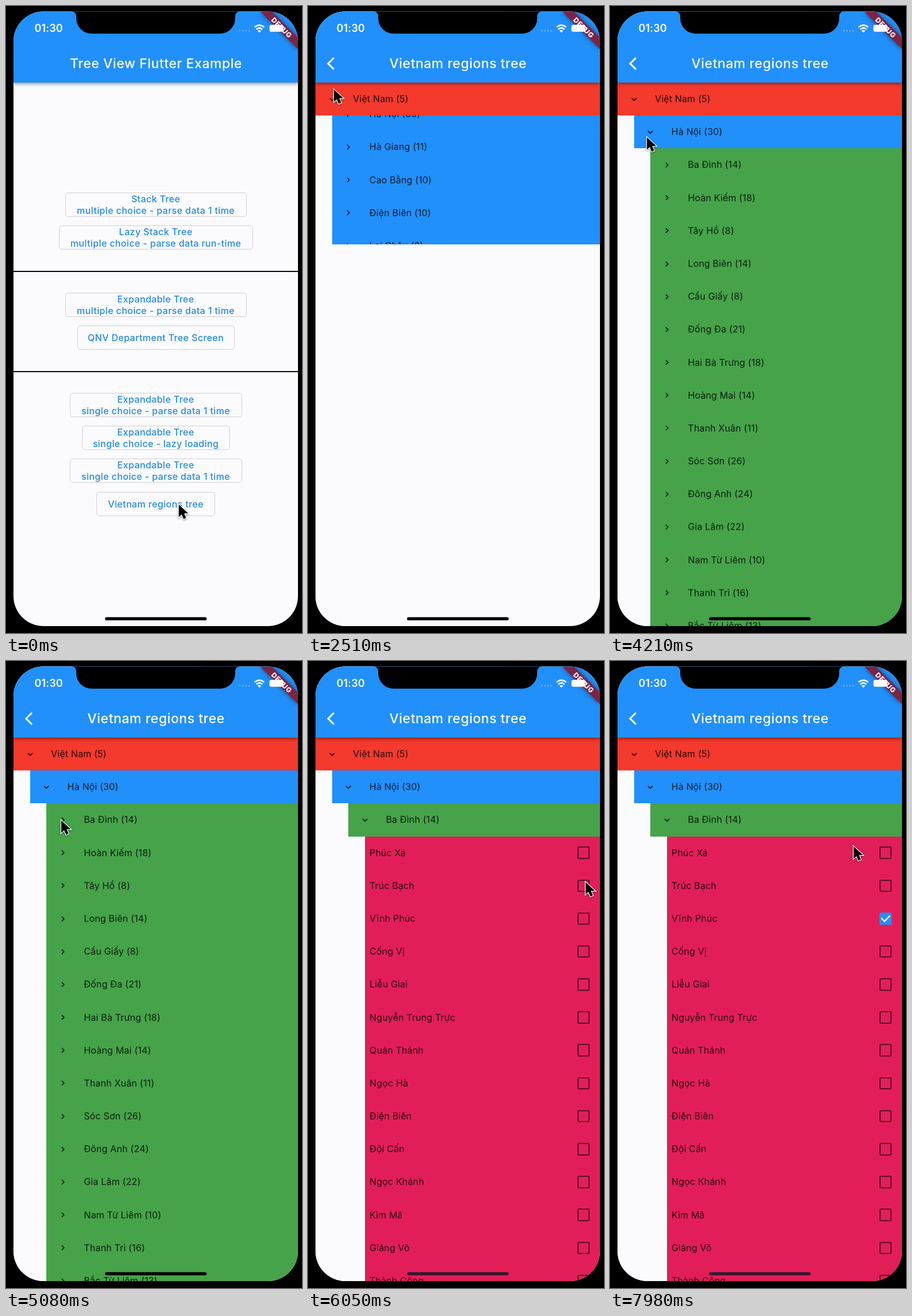
Write an HTML page that moves like this. It is 514 px wide and 1089 px high and loops after 8000 ms.

```html
<!DOCTYPE html>
<html lang="en">
<head>
<meta charset="utf-8">
<title>Tree view demo</title>
<style>
  html, body { margin: 0; width: 100%; height: 100%; overflow: hidden; background: #000; }
  body { position: relative; font: 400 16px Inter, "Noto Sans", sans-serif; letter-spacing: .15px; }
  #screen, .overlay { position: absolute; left: 0; top: 0; width: 514px; height: 1089px; }
  #screen { clip-path: inset(9.5px 7px 12px 13px round 52px); }
  .page { position: absolute; left: 13px; top: 0; width: 494px; height: 1089px; background: #fbfbfd; }
  #detail { box-shadow: 0 0 22px rgba(0, 0, 0, .2); }
  .bar { position: absolute; left: 0; top: 0; width: 494px; height: 133px; background: #2190fb;
    box-shadow: 0 2px 6px rgba(0, 0, 0, .46); z-index: 2; }
  .bar b { position: absolute; left: 0; width: 495px; top: 84px; line-height: 32px; text-align: center;
    color: #fff; font-weight: 450; font-size: 23px; letter-spacing: .5px; white-space: nowrap; }
  .bar svg { position: absolute; left: 18px; top: 88px; }
  .button { position: absolute; height: 42px; box-sizing: border-box; border: 1px solid #cfcfd6; border-radius: 5px;
    display: flex; align-items: center; justify-content: center; text-align: center; white-space: pre;
    font-weight: 500; line-height: 20px; letter-spacing: .35px; color: #2389e6; overflow: hidden; }
  .rule { position: absolute; left: 0; width: 494px; height: 2.4px; background: #060b02; }
  #ripple { position: absolute; left: 143px; top: 21px; width: 0; height: 0; }
  #ripple i { position: absolute; left: -190px; top: -190px; width: 380px; height: 380px; border-radius: 50%;
    background: rgba(33, 144, 251, .2); }
  #tree { position: absolute; left: 0; top: 133px; width: 494px; }
  .row { position: relative; height: 57.2px; line-height: 57.2px; white-space: nowrap; color: rgba(0, 0, 0, .82); }
  .row span { position: absolute; left: 65px; }
  .leaf span { left: 8px; }
  .row svg { position: absolute; left: 20.6px; top: 20.6px; }
  .kids { margin-left: 28.6px; overflow: hidden; }
  .box { position: absolute; right: 18px; top: 17.8px; width: 21.5px; height: 21.5px; box-sizing: border-box;
    border: 2.4px solid rgba(0, 0, 0, .58); border-radius: 2px; }
  .row .tick { left: auto; right: 18px; top: 17.8px; opacity: 0; }
</style>
</head>
<body>
<div id="screen">
  <div class="page" id="home"><div class="bar"><b>Tree View Flutter Example</b></div></div>
  <div class="page" id="detail">
    <div class="bar">
      <svg width="18" height="24" fill="none" stroke="#fff" stroke-width="3"><path d="M14 2 4 12l10 10"/></svg>
      <b>Vietnam regions tree</b>
    </div>
    <div id="tree"></div>
  </div>
  <svg class="overlay">
    <path d="M442 10h20l45 45v20z" fill="#7d2346" style="filter:drop-shadow(0 0 4px #0008)"/>
    <text transform="translate(478.5 38) rotate(45)" text-anchor="middle" y="4" fill="#fff" font-size="12"
      font-weight="800" letter-spacing=".6">DEBUG</text>
    <text x="49.5" y="45.3" fill="#fff" font-size="18" font-weight="600">01:30</text>
    <g fill="#fff">
      <g opacity=".3"><circle cx="406" cy="43" r="1.5"/><circle cx="411.5" cy="43" r="1.5"/>
        <circle cx="417" cy="43" r="1.5"/><circle cx="422.5" cy="43" r="1.5"/></g>
      <path d="M440 46.3l-3.2-3.4q3.2-2.4 6.4 0z"/>
      <path d="M431.6 36.8q8.4-7 16.8 0M434.6 40.4q5.4-4.4 10.8 0" fill="none" stroke="#fff" stroke-width="2.6"/>
      <rect x="457.5" y="32.8" width="23.5" height="12" rx="3"/><rect x="482" y="36.5" width="2" height="4.5" rx="1"/>
    </g>
    <path d="M114 0v9.5a8 8 0 0 1 8 8v4a26.5 26.5 0 0 0 26.5 26.5h223a26.5 26.5 0 0 0 26.5-26.5v-4a8 8 0 0 1 8-8V0z"/>
    <rect id="indicator" x="172" y="1061.5" width="176.5" height="5.6" rx="2.8"/>
  </svg>
</div>
<svg class="overlay">
  <path id="cursor" d="M0 0v21.5l5-4.6 3.5 8 4.2-1.8-3.5-7.8 7-.2z" stroke="#fff" stroke-width="2.4"
    paint-order="stroke" style="filter:drop-shadow(0 1px 1.5px #0007)"/>
</svg>
<script>
const ROW = 57.2, LOOP = 8000;
const COLORS = ['#f4392d', '#2190fb', '#46a34a', '#e21e58'];
const CHEVRON = { right: 'M5.8 4l4 4-4 4', down: 'M3.8 6l4.2 4.2L12.2 6' };
const byId = id => document.getElementById(id);

function add(parent, className, html = '') {
  const el = document.createElement('div');
  el.className = className;
  el.innerHTML = html;
  parent.append(el);
  return el;
}

// Home page
const once = 'parse data 1 time', multi = 'multiple choice - ', single = 'single choice - ';
const buttons = [
  [324, 315, 'Stack Tree\n' + multi + once],
  [381, 337, 'Lazy Stack Tree\n' + multi + 'parse data run-time'],
  [498, 315, 'Expandable Tree\n' + multi + once],
  [555, 273, 'QNV Department Tree Screen'],
  [672, 299, 'Expandable Tree\n' + single + once],
  [729, 257, 'Expandable Tree\n' + single + 'lazy loading'],
  [786, 299, 'Expandable Tree\n' + single + once],
  [843.5, 206, 'Vietnam regions tree']
].map(([top, width, label]) => {
  const el = add(byId('home'), 'button', label);
  el.style.cssText = `top:${top}px;width:${width}px;left:${247 - width / 2}px`;
  return el;
});
for (const y of [460, 634]) add(byId('home'), 'rule').style.top = y + 'px';
const ripple = add(buttons[7], '', '<i></i>');
ripple.id = 'ripple';

// Tree
const names = [
  ['Việt Nam (5)'],
  ['Hà Nội (30)', 'Hà Giang (11)', 'Cao Bằng (10)', 'Điện Biên (10)', 'Lai Châu (8)'],
  ('Ba Đình (14),Hoàn Kiếm (18),Tây Hồ (8),Long Biên (14),Cầu Giấy (8),Đống Đa (21),Hai Bà Trưng (18),' +
   'Hoàng Mai (14),Thanh Xuân (11),Sóc Sơn (26),Đông Anh (24),Gia Lâm (22),Nam Từ Liêm (10),Thanh Trì (16),' +
   'Bắc Từ Liêm (13),Mê Linh (18),Hà Đông (17),Sơn Tây (15),Ba Vì (31),Phúc Thọ (21),Đan Phượng (16),' +
   'Hoài Đức (20),Quốc Oai (21),Thạch Thất (23),Chương Mỹ (32),Thanh Oai (21),Thường Tín (29),' +
   'Phú Xuyên (27),Ứng Hòa (29),Mỹ Đức (22)').split(','),
  ('Phúc Xá,Trúc Bạch,Vĩnh Phúc,Cống Vị,Liễu Giai,Nguyễn Trung Trực,Quán Thánh,Ngọc Hà,Điện Biên,Đội Cấn,' +
   'Ngọc Khánh,Kim Mã,Giảng Võ,Thành Công').split(',')
];
const branches = [], ticks = [];

function build(parent, level) {
  names[level].forEach((name, i) => {
    const leaf = level === 3;
    const row = add(parent, leaf ? 'row leaf' : 'row', `<span>${name}</span>` + (leaf
      ? `<div class="box"></div><svg class="tick" width="21.5" height="21.5"><rect width="21.5" height="21.5" rx="2"
         fill="#2190fb"/><path d="M3.2 9.7l5.4 5.4 9.7-9.7" fill="none" stroke="#fff" stroke-width="2.4"/></svg>`
      : `<svg width="16" height="16" fill="none" stroke="#000" stroke-opacity=".85" stroke-width="1.7">
         <path d="${CHEVRON.right}"/></svg>`));
    row.style.background = COLORS[level];
    if (leaf) ticks.push(row.querySelector('.tick'));
    else if (i === 0) {
      const kids = add(parent, 'kids'), inner = add(kids, '');
      branches[level] = { kids, inner, arrow: row.querySelector('path'), count: names[level + 1].length };
      build(inner, level + 1);
    }
  });
}
build(byId('tree'), 0);

// Timing
const clamp = x => Math.min(1, Math.max(0, x));
const span = (t, start, length) => clamp((t - start) / length);
const smooth = x => x * x * (3 - 2 * x);

function bezier(x1, y1, x2, y2) {
  const at = (s, a, b) => 3 * (1 - s) * (1 - s) * s * a + 3 * (1 - s) * s * s * b + s * s * s;
  return x => {
    if (x <= 0 || x >= 1) return clamp(x);
    let lo = 0, hi = 1;
    for (let i = 0; i < 24; i++) {
      const mid = (lo + hi) / 2;
      if (at(mid, x1, x2) < x) lo = mid; else hi = mid;
    }
    return at(lo, y1, y2);
  };
}
const expandEase = bezier(.4, 0, .2, 1), slideEase = bezier(.35, .91, .33, .97);
const openAt = [2410, 3710, 5170];
const path = [
  [1300, 300, 866], [1530, 165, 470], [1730, 165, 470], [2040, 45, 145], [3000, 45, 145], [3420, 64, 228],
  [4550, 64, 228], [4930, 96, 277], [5480, 96, 277], [6000, 482, 384], [6450, 482, 384], [6800, 485, 441],
  [7420, 485, 441], [7960, 423, 322]
];

function cursorAt(t) {
  const next = path.findIndex(p => p[0] > t);
  if (next === 0) return path[0].slice(1);
  if (next < 0) return path[path.length - 1].slice(1);
  const [t0, x0, y0] = path[next - 1], [t1, x1, y1] = path[next];
  const k = smooth((t - t0) / (t1 - t0));
  return [x0 + (x1 - x0) * k, y0 + (y1 - y0) * k];
}

function render(t) {
  const slide = slideEase(span(t, 260, 500));
  byId('home').style.transform = `translateX(${-494 / 3 * slide}px)`;
  byId('detail').style.transform = `translateX(${494 * (1 - slide)}px)`;
  byId('detail').style.visibility = slide ? 'visible' : 'hidden';
  ripple.style.transform = `scale(${span(t, 30, 260)})`;
  ripple.style.opacity = 1 - span(t, 260, 300);

  let nested = 0;
  for (let i = 2; i >= 0; i--) {
    const { kids, inner, arrow, count } = branches[i];
    const full = count * ROW + nested;
    nested = full * expandEase(span(t, openAt[i], 200));
    kids.style.height = nested + 'px';
    // Whole pixels keep hairline gaps from opening between rows
    inner.style.transform = `translateY(${Math.round((nested - full) / 2)}px)`;
    arrow.setAttribute('d', t >= openAt[i] ? CHEVRON.down : CHEVRON.right);
  }

  const second = span(t, 7080, 120);
  ticks[1].style.opacity = span(t, 6220, 120) * (1 - second);
  ticks[2].style.opacity = second;
  byId('indicator').setAttribute('fill', t < 5380 ? '#000' : '#38172c');
  byId('cursor').setAttribute('transform', `translate(${cursorAt(t)})`);
}

function frame() {
  render(performance.now() % LOOP);
  requestAnimationFrame(frame);
}
frame();
</script>
</body>
</html>
```
